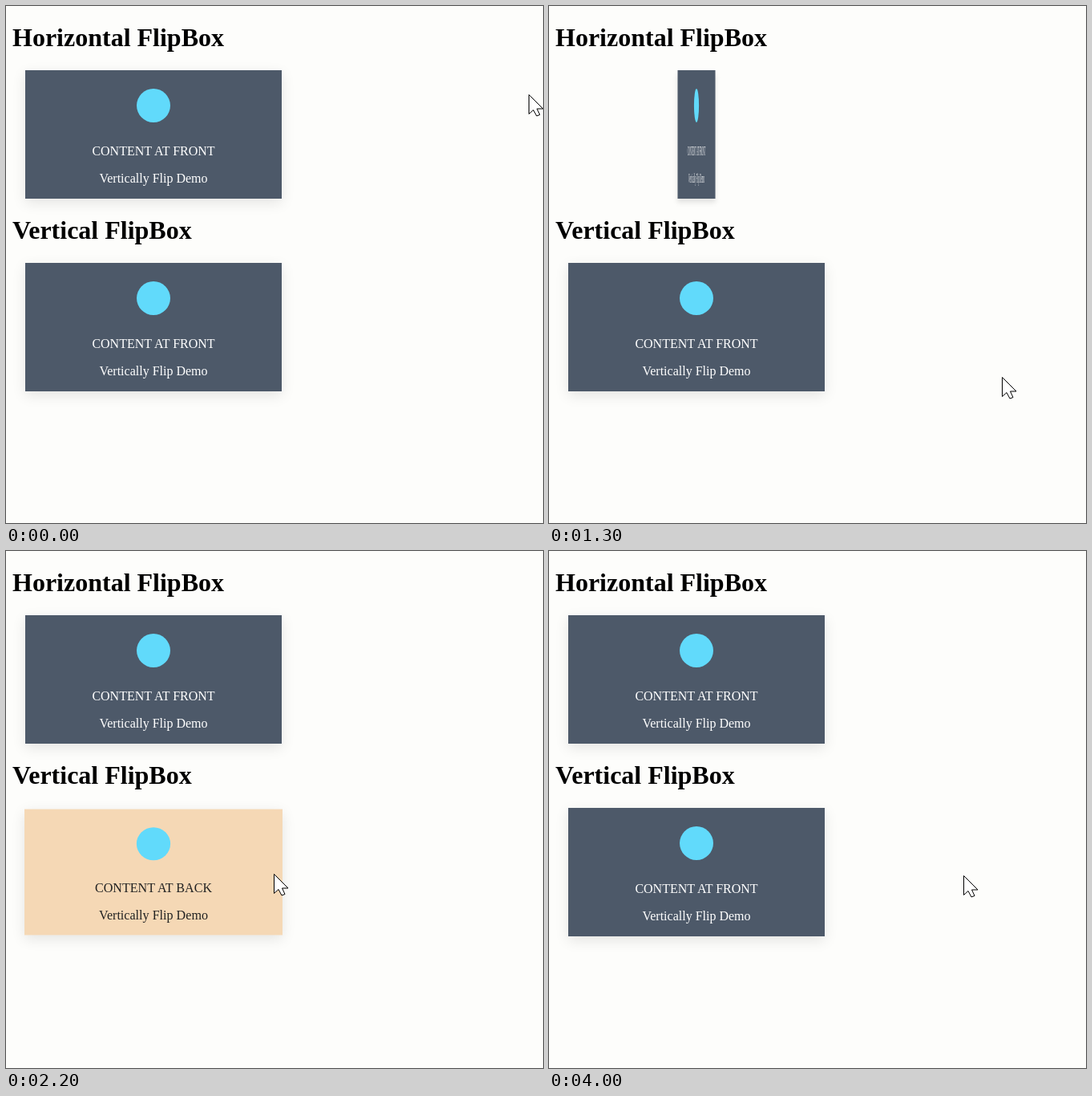
An HTML page for the animation above (4100 ms loop, 670 by 644 pixels).

```html
<!DOCTYPE html>
<html lang="en">
<head>
<meta charset="utf-8">
<title>FlipBox</title>
<style>
  html, body { margin: 0; width: 100%; height: 100%; overflow: hidden; background: #fdfdfb; }
  body { position: relative; font: 16px/18px "Liberation Serif", "Times New Roman", serif; }
  h1, .box, .face, p, .logo, #cursor { position: absolute; margin: 0; }
  h1 { left: 8px; font-size: 32px; line-height: 36px; color: #000; white-space: nowrap; }
  .box { left: 24px; width: 320px; height: 160px; }
  .face { inset: 0; text-align: center; box-shadow: 0 5px 16px rgba(0, 0, 0, .1); }
  .front { background: #4d5969; color: #fff; }
  .back { background: #f5d8b5; color: #222; }
  .logo { left: 139px; top: 23px; width: 42px; height: 42px; border-radius: 50%; background: #61dafb; }
  p { width: 100%; top: 92px; }
  p + p { top: 126px; }
  #cursor { left: 0; top: 0; overflow: visible; }
</style>
</head>
<body>
<script>
  const LOOP = 4100, STEP = 100, FLIP = 800, BACK_ZOOM = 1.006;

  const face = side => `<div class="face ${side}"><div class="logo"></div>
    <p>CONTENT AT ${side.toUpperCase()}</p><p>Vertically Flip Demo</p></div>`;
  const section = (name, top) => `<h1 style="top:${top}px">${name} FlipBox</h1>
    <div class="box" style="top:${top + 59}px">${face('front')}${face('back')}</div>`;

  document.body.insertAdjacentHTML('beforeend',
    section('Horizontal', 21) + section('Vertical', 261) +
    `<svg id="cursor" width="20" height="30"><path transform="translate(.5 .5)"
      d="M0 0V24L5.5 19L9.5 26.5L13.5 25L10 17.5H17.5Z" fill="#fff" stroke="#000"/></svg>`);

  const boxes = [...document.querySelectorAll('.box')].map(box => [...box.children]);
  const cursor = document.getElementById('cursor');

  // time, x, y
  const path = [
    [0, 652, 110], [100, 652, 110], [350, 340, 127], [450, 277, 131], [900, 277, 131],
    [1046, 346, 195], [1300, 565, 462], [1450, 565, 462], [1662, 342, 404], [1700, 334, 402],
    [2570, 334, 402], [2666, 346, 402], [2800, 517, 404], [LOOP, 517, 404]
  ];

  const bezier = (a, b, u) => 3 * a * u * (1 - u) ** 2 + 3 * b * u * u * (1 - u) + u ** 3;

  // CSS "ease" timing curve
  function ease(x) {
    if (x <= 0) return 0;
    if (x >= 1) return 1;
    let low = 0, high = 1;
    for (let i = 0; i < 24; i++) {
      const mid = (low + high) / 2;
      if (bezier(.25, .25, mid) < x) low = mid; else high = mid;
    }
    return bezier(.1, 1, low);
  }

  function flip([front, back], t, enter, leave, vertical) {
    const turn = ease((t - enter) / FLIP) - ease((t - leave) / FLIP);
    const c = Math.cos(Math.PI * turn), size = Math.abs(c);
    const scale = zoom => vertical ? `scale(${zoom}, ${zoom * size})` : `scale(${zoom * size}, ${zoom})`;
    front.style.visibility = c >= 0 ? 'visible' : 'hidden';
    back.style.visibility = c < 0 ? 'visible' : 'hidden';
    front.style.transform = scale(1);
    back.style.transform = scale(BACK_ZOOM);
  }

  function moveCursor(t) {
    const i = path.findIndex(point => point[0] > t);
    const [t0, x0, y0] = path[i - 1], [t1, x1, y1] = path[i];
    const k = (t - t0) / (t1 - t0);
    const x = Math.round(x0 + (x1 - x0) * k), y = Math.round(y0 + (y1 - y0) * k);
    cursor.style.transform = `translate(${x}px, ${y}px)`;
  }

  function draw() {
    const t = Math.floor(performance.now() % LOOP / STEP) * STEP;
    flip(boxes[0], t, 350, 1046, false);
    flip(boxes[1], t, 1662, 2666, true);
    moveCursor(t);
    requestAnimationFrame(draw);
  }
  draw();
</script>
</body>
</html>
```
